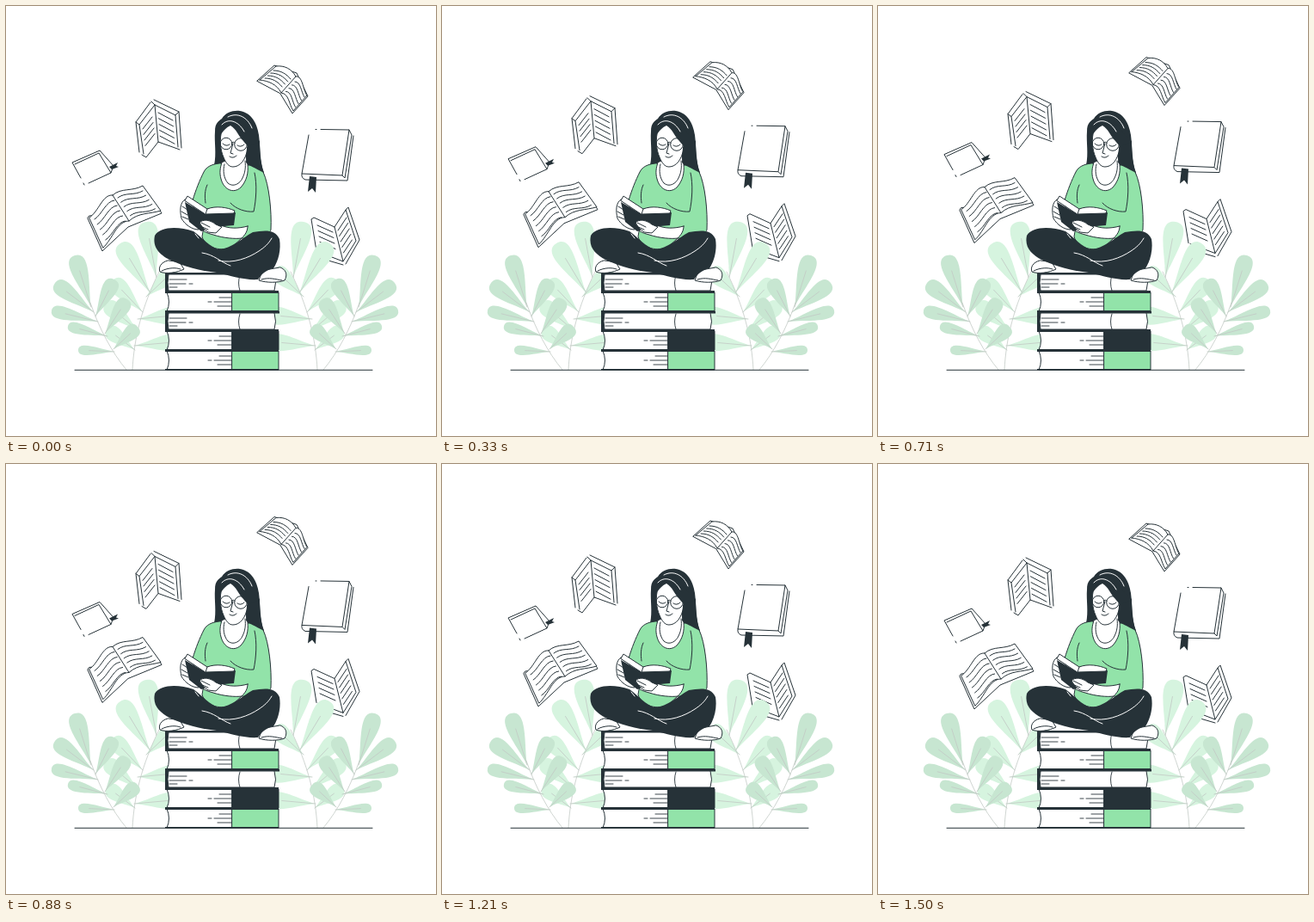
These frames come from a looping animation (500x500 px, 1.54 s). An HTML page:

```html
<!DOCTYPE html>
<html lang="en">
<head>
<meta charset="utf-8">
<title>Reading</title>
<style>
  html, body { margin: 0; height: 100%; overflow: hidden; background: #fff; }
  svg { display: block; width: 100vw; height: 100vh; }
  path, circle { stroke-linecap: round; stroke-linejoin: round; }
  .ink { stroke: #263238; fill: none; }
  .paper { stroke: #263238; fill: #fff; }
  .blank { fill: #fff; }
  .dark { fill: #263238; }
  .green { fill: #92e3a9; stroke: #263238; }
  .light { stroke: #fff; fill: none; }
  .stem { stroke: #c3cbc6; fill: none; stroke-width: .8; }
</style>
</head>
<body>
<svg viewBox="0 0 500 500">
  <g id="books"></g>
  <g id="plant"></g>
  <use href="#plant" transform="translate(509 0) scale(-1 1)"/>
  <g id="stack"></g>
  <path class="ink" d="M80 423.3H426"/>
  <g id="reader">
    <!-- hair behind, neck and torso -->
    <path class="dark" d="M242 185C245 172 242 158 243 146C243 136 247 134 251 131C255 124 264 121 272 122C285 124 292 136 294 150C296 166 295 180 300 194L281 188L250 183Z"/>
    <path class="green" d="M248 183C239 184 233 187 230 193C225 203 221 213 217 226L233 240L228 268C231 280 247 286 262 281L274 270C290 271 306 268 308 260C309 238 306 208 299 193C294 186 287 185 281 185Z"/>
    <path class="paper" d="M251 182C249 188 248 194 250 201C253 213 264 219 273 211C280 203 282 194 281 184L278 170Z"/>
    <path class="ink" d="M254 184C252 191 253 200 258 206C264 211 272 207 275 200C278 194 279 188 278 180"/>
    <path class="ink" d="M234 208C231 214 231 222 232 229M289 194C292 207 291 225 288 239C279 240 267 236 261 229"/>
    <!-- face -->
    <path class="paper" d="M251 145C248 154 249 167 253 176C256 183 259 187 264 187C272 187 279 179 281 165C281 152 270 141 261 137Z"/>
    <path class="dark" d="M248 152C250 136 259 131 269 134C281 138 286 151 295 157L295 165C288 167 281 164 276 157C270 151 268 143 261 139C256 141 252 146 248 152Z"/>
    <path class="dark" d="M280 164L295 158C295 172 296 184 300 194C289 188 283 186 279 182Z"/>
    <path class="light" d="M258 129C269 123 281 129 286 142M251 138C258 130 270 133 277 146"/>
    <g class="ink">
      <circle cx="256" cy="160" r="6.8"/>
      <circle cx="273" cy="161" r="7.3"/>
      <path d="M262.800 159Q264 157 266 159M252 160Q256 164 260 161M269 162Q273 165 277 161M264 160L261 171L264 172M260 175Q264 178 268 174"/>
    </g>
    <!-- crossed legs and shoes -->
    <path class="paper" d="M188 296C180 298 177 304 179 309C186 312 199 310 207 306L202 298Z"/>
    <path class="paper" d="M298 308L294 319C303 322 316 322 324 319C328 312 325 306 319 304Z"/>
    <path class="ink" d="M181 308C189 304 198 304 203 306M297 318C306 315 314 318 321 319"/>
    <path class="dark" d="M173 267C170 281 179 289 190 295C207 303 226 308 245 310C263 314 277 319 293 318C297 311 305 306 311 305C317 296 320 283 318 271C313 259 300 261 287 263C274 270 263 282 247 283C237 280 229 270 218 262C201 256 179 256 173 267Z"/>
    <path class="light" d="M228 287C242 289 250 298 261 302M247 296C264 300 282 293 294 285C300 281 305 277 309 270M220 265L224 270"/>
    <!-- book in hands -->
    <path class="paper" d="M281 256C270 259 259 259 250 255L237 250C231 248 226 251 224 255C226 261 233 264 241 266C253 270 267 271 274 270C278 266 281 262 281 256Z"/>
    <path class="paper" d="M208 225C202 229 202 238 204 247C208 254 216 260 224 260L229 252L214 226Z"/>
    <path class="dark" d="M208 228L232 242L267 240L265 255L242 257L227 262L213 251Z"/>
    <path class="paper" d="M208 226L211 221L234 236C244 232 257 234 266 238L265 241L232 242Z"/>
    <path class="ink" d="M234 236L232 242"/>
    <path class="paper" d="M225 252C229 247 238 249 244 254L251 257L244 264L235 263Q228 259 225 252Z"/>
    <path class="ink" d="M227 252L237 257M226 256L235 260M205 233L211 237M204 239L211 243M205 245L212 248"/>
  </g>
</svg>
<script>
const get = id => document.getElementById(id);
const path = (cls, d, extra = '') => `<path class="${cls}" d="${d}" ${extra}/>`;

// Repeats one relative stroke n times along a direction.
const rows = (x, y, dx, dy, n, stroke) => {
  let d = '';
  for (let i = 0; i < n; i++) d += `M${x + dx * i} ${y + dy * i}${stroke}`;
  return path('ink', d);
};

get('books').innerHTML = [
  // open, top right
  path('paper', 'M292 87L312 69L338 78L351 105L333 125L319 102Z'),
  path('paper', 'M295 86L314 70C324 69 332 73 337 82C345 81 345 97 350 104L334 122C329 114 329 102 320 101C315 91 305 87 295 86Z'),
  path('ink', 'M337 82L320 101'),
  rows(311, 75, -3.3, 3, 4, 'c9 0 15 4 20 10'),
  rows(336, 88, -3.5, 3.8, 4, 'c7 0 7 12 11 18'),
  // open, left
  path('paper', 'M95 247L112 285L142 257L181 241L178 236L97 244Z'),
  path('paper', 'M97 246C108 239 112 219 124 220C134 211 147 216 159 209L180 238C167 242 154 240 143 250C129 250 124 271 113 281Z'),
  path('ink', 'M124 220L143 250'),
  rows(103, 248, 3.2, 6, 5, 'c9 -6 13 -21 23 -22'),
  rows(130, 223, 3.6, 5.2, 5, 'c9 -7 19 -2 29 -8'),
  // standing, left
  path('blank', 'M151 135L171 109L201 122L204 167L177 158L163 176L155 170Z'),
  path('ink', 'M155 170L151 135L168 112M172 109L201 123L204 165M202 167L177 158L163 176L158 173M169 111L173 115L177 158M173 115L197 127L201 123M197 127L200 164M151 135L155 138L173 115M155 138L160 172'),
  rows(159, 143, 1, 6.500, 4, 'l11 -14'),
  rows(177, 124, .5, 6.800, 5, 'l17 9'),
  // standing, right
  path('blank', 'M355 247L380 257L395 235L398 234L411 272L394 301L361 292Z'),
  path('ink', 'M361 285L355 248L358 246L382 257L392 297L363 286M382 257L395 237L407 273L392 297M395 237L398 234L411 272L395 300M361 292L392 301'),
  rows(362, 255, 1, 6.500, 4, 'l18 8'),
  rows(386, 261, 1.600, 6.500, 5, 'l10 -15'),
  // closed, left
  path('blank', 'M77 181L108 168L126 186L122 193L91 208Z'),
  path('ink', 'M96 206L122 194L108 171L80 184M91 208L90 206M87 200L77 182L109 168L125 186L122 194'),
  path('dark', 'M120 187L130 182L128 186L131 187L123 190Z'),
  // closed, right
  path('blank', 'M352 144H399L405 151L397 202L347 203L343 195Z'),
  path('ink', 'M366 143.500L399 144L391 197L344 195L352 150M360 143.500H361M399 144L402 150L394 200L391 197M404 151L397 203L348 202Q343 200 344 195'),
  path('dark', 'M353 198L361 199L360 217L356 212L351 216Z')
].join('');

const leaf = (color, x, y, tipX, tipY, width) => {
  const len = Math.hypot(tipX - x, tipY - y);
  const angle = Math.atan2(tipY - y, tipX - x) * 180 / Math.PI;
  const near = width * .15, far = width * 1.05;
  return `<g transform="translate(${x} ${y}) rotate(${angle})">` +
    `<path fill="${color}" d="M0 0C${len * .35} ${-near} ${len} ${-far} ${len} 0C${len} ${far} ${len * .35} ${near} 0 0"/>` +
    path('stem', `M0 0H${len * .7}`) + '</g>';
};

const inner = [
  [175, 316, 163, 251, 23], [168, 334, 133, 276, 22], [159, 356, 124, 319, 20],
  [153, 377, 116, 346, 19], [150, 400, 118, 376, 18], [163, 338, 197, 306, 20],
  [153, 364, 205, 359, 21], [149, 395, 205, 390, 20]
];
const outer = [
  [99, 350, 80, 290, 20], [102, 356, 57, 322, 19], [107, 367, 53, 354, 15],
  [104, 361, 126, 318, 18], [115, 381, 141, 341, 18], [125, 399, 153, 373, 17],
  [118, 384, 72, 372, 13], [126, 402, 84, 400, 11]
];
get('plant').innerHTML =
  inner.map(l => leaf('#d6f4df', ...l)).join('') +
  path('stem', 'M147 423C149 385 158 350 178 309') +
  outer.map(l => leaf('#c7e6d1', ...l)).join('') +
  path('stem', 'M140 423C123 403 108 374 98 345');

const plainBook = y =>
  path('dark', `M185 ${y}H318V${y + 2.500}H189V${y + 21}H317V${y + 23.500}H185Z`) +
  path('paper', `M189 ${y + 2}H312Q315 ${y + 12} 312 ${y + 21}H189Q187 ${y + 12} 189 ${y + 2}Z`) +
  path('ink', `M272 ${y + 3}Q269 ${y + 12} 272 ${y + 21}M190 ${y + 8}H210M190 ${y + 13}H209M213 ${y + 13}H217M190 ${y + 17}H199`, 'stroke-width=".9"');
const boundBook = (y, color) =>
  path('paper', `M187 ${y}H263V${y + 22}H187Q192 ${y + 11} 187 ${y}Z`) +
  path('ink', `M262 ${y + 6}H248M262 ${y + 11}H242M239 ${y + 11}H235M262 ${y + 16}H246`, 'stroke-width=".9"') +
  `<path class="ink" style="fill:${color}" d="M263 ${y}H317V${y + 22}H263Z"/>` +
  path('dark', `M185 ${y - 1}H317V${y + 1}H185ZM185 ${y + 21}H317V${y + 22.500}H185Z`);

get('stack').innerHTML =
  boundBook(401, '#92e3a9') + boundBook(378, '#263238') + plainBook(355) +
  boundBook(333, '#92e3a9') + plainBook(310);

// Vertical float: time in ms, offset in px.
const float = [[0, 0], [540, -7], [730, -9.700], [1080, -4.700], [1330, -1.500], [1500, 0], [1540, 0]];
function frame(now) {
  const t = now % 1540;
  const i = float.findIndex(key => key[0] > t);
  const [t0, y0] = float[i - 1], [t1, y1] = float[i];
  const y = y0 + (y1 - y0) * (t - t0) / (t1 - t0);
  get('books').setAttribute('transform', `translate(0 ${y})`);
  requestAnimationFrame(frame);
}
frame(performance.now());
</script>
</body>
</html>
```
